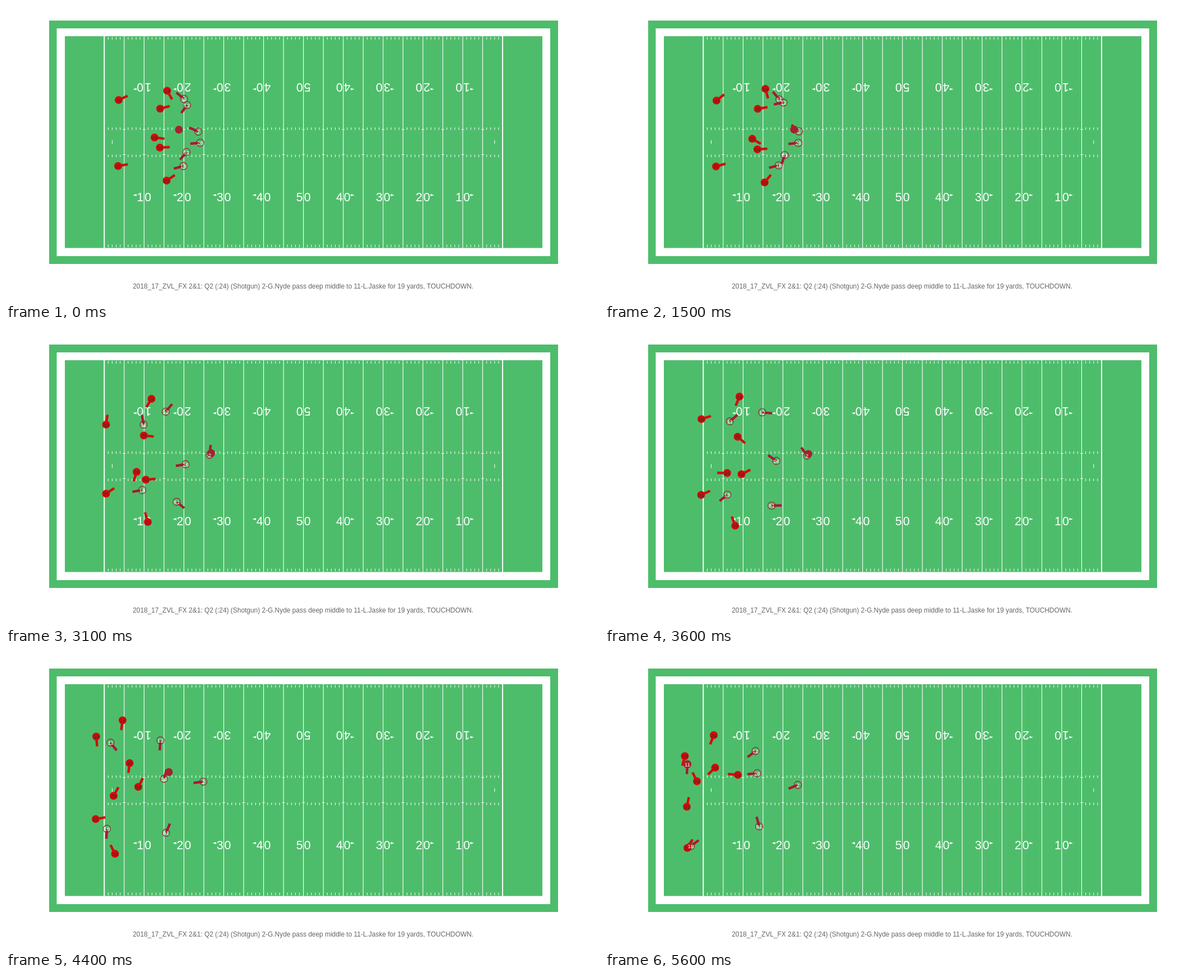
An HTML page with a canvas that plays this animation: 1058 px wide and 529 px high, repeating every 5.7 s.

```html
<!DOCTYPE html>
<html lang="en">
<head>
<meta charset="utf-8">
<title>Football play</title>
<style>
  html, body { margin: 0; width: 100%; height: 100%; overflow: hidden; background: #fff; }
  canvas { display: block; width: 100vw; height: 100vh; }
</style>
</head>
<body>
<canvas id="stage" width="1058" height="529"></canvas>
<script>
const ctx = document.getElementById('stage').getContext('2d');
const FONT = '"Liberation Sans", Arial, sans-serif';
const GREEN = '#4ebd6b';
const CAPTION = '2018_17_ZVL_FX 2&1: Q2 (:24) (Shotgun) 2-G.Nyde pass deep middle to 11-L.Jaske for 19 yards, TOUCHDOWN.';
const LOOP = 5700, STEP = 100;
const SNAP = 1000, SNAP_CAUGHT = 1750, THROW = 3900, PASS_CAUGHT = 5400;
const POSE_TIMES = [SNAP, 3100, 4400, 5600];
const DEFENSE = { color: '#d50a0a', text: '#34302b', filled: true };
const OFFENSE = { color: '#a71930', text: '#fff', filled: false };
const BALL = { color: '#a5222d', spot: { x: 308.5, y: 221 }, carry: { x: 2.5, y: -3 } };

const yardX = yard => 175.3 + 7.107 * yard;
const mix = (a, b, u) => a + (b - a) * u;
const mixPoint = (p, q, u) => ({ x: mix(p.x, q.x, u), y: mix(p.y, q.y, u) });

// ---- motion ----
const players = [];

// A route is the pose [x, y, facing in degrees] at each of POSE_TIMES.
function player(team, number, ...route) {
  const p = { team, number, route };
  players.push(p);
  return p;
}

player(DEFENSE, 39, [201, 168, -25], [178.5, 169, -82], [161, 147.5, 85], [142.5, 182.5, 105]);
player(DEFENSE, 24, [287.5, 151.5, 60], [259.5, 123, 121], [208, 118.5, 98], [194, 145, 111]);
player(DEFENSE, 35, [275, 183.5, -15], [246, 188.5, 6], [220.5, 195, 97], [196.5, 203, 136]);
player(DEFENSE, 26, [265, 235, 7], [233, 253.5, 107], [192, 253.5, 299], [164, 227.5, 244]);
player(DEFENSE, 54, [274.5, 253, -3], [249.5, 267.5, -5], [236, 237.5, -62], [237, 216, -175]);
player(DEFENSE, 31, [200, 286, -10], [178.5, 292.5, -34], [160, 295, -10], [146, 273, -78]);
player(DEFENSE, 33, [286.5, 312, -34], [253, 343, -106], [194.5, 357, -117], [147, 346.5, -59]);

const receiver =
player(OFFENSE, 11, [317.5, 166, -140], [245.5, 169, -99], [186.5, 158.5, 52], [147, 197, 93]);
player(OFFENSE, 12, [323, 177, 126], [285, 146, 310], [275.5, 154.5, 454], [268.5, 173.5, 503]);
const passer =
player(OFFENSE, 2, [343, 224.5, -156], [363.5, 223, -85], [352, 228, -188], [344, 234, -202]);
player(OFFENSE, 26, [346.5, 244.5, 175], [320.5, 240, 171], [282, 223, 286], [271.5, 213, 174]);
player(OFFENSE, 81, [322, 261, 130], [304.5, 307, 40], [285.5, 319.5, -67], [275, 308, -105]);
player(OFFENSE, 18, [316.5, 286, 165], [243, 286, 170], [180, 312.5, 93], [153, 343.5, -37]);

// Cubic through the poses: starts from rest, runs on at the end.
function smooth(values, i, u) {
  const span = k => POSE_TIMES[k + 1] - POSE_TIMES[k];
  const rate = k => (values[k + 1] - values[k]) / span(k);
  const slope = k => {
    if (k === 0) return 0;
    if (k === values.length - 1) return 2 * rate(k - 1) - slope(k - 1);
    return mix(rate(k - 1), rate(k), span(k - 1) / (span(k - 1) + span(k)));
  };
  const v = 1 - u;
  return values[i] * v * v * (1 + 2 * u) + values[i + 1] * u * u * (3 - 2 * u)
    + span(i) * u * v * (v * slope(i) - u * slope(i + 1));
}

function poseAt(p, t) {
  const time = Math.max(t, SNAP);
  let i = 0;
  while (i < POSE_TIMES.length - 2 && time >= POSE_TIMES[i + 1]) i++;
  const u = (time - POSE_TIMES[i]) / (POSE_TIMES[i + 1] - POSE_TIMES[i]);
  const [x, y] = [0, 1].map(axis => smooth(p.route.map(pose => pose[axis]), i, u));
  return { x, y, angle: mix(p.route[i][2], p.route[i + 1][2], u) * Math.PI / 180 };
}

function passerHands(t) {
  const p = poseAt(passer, t);
  return { x: p.x + BALL.carry.x, y: p.y + BALL.carry.y };
}

// Snapped, carried by the passer, thrown, then carried by the receiver.
function ballAt(t) {
  if (t < SNAP) return BALL.spot;
  if (t < SNAP_CAUGHT)
    return mixPoint(BALL.spot, passerHands(SNAP_CAUGHT), (t - SNAP) / (SNAP_CAUGHT - SNAP));
  if (t < THROW) return passerHands(t);
  if (t < PASS_CAUGHT)
    return mixPoint(passerHands(THROW), poseAt(receiver, PASS_CAUGHT), (t - THROW) / (PASS_CAUGHT - THROW));
  return poseAt(receiver, t);
}

// ---- drawing ----
function box(color, left, top, right, bottom) {
  ctx.fillStyle = color;
  ctx.fillRect(left, top, right - left, bottom - top);
}

function line(x1, y1, x2, y2, width, color = '#fff') {
  ctx.strokeStyle = color;
  ctx.lineWidth = width;
  ctx.beginPath();
  ctx.moveTo(x1, y1);
  ctx.lineTo(x2, y2);
  ctx.stroke();
}

function disc(x, y, radius, color, filled) {
  ctx.beginPath();
  ctx.arc(x, y, radius, 0, 2 * Math.PI);
  ctx.fillStyle = ctx.strokeStyle = color;
  ctx.lineWidth = 1.1;
  if (filled) ctx.fill(); else ctx.stroke();
}

function label(text, x, baseline, size, color, spacing = 0) {
  ctx.font = `${size}px ${FONT}`;
  ctx.letterSpacing = `${spacing}px`;
  ctx.textAlign = 'center';
  ctx.fillStyle = color;
  ctx.fillText(text, x + spacing / 2, baseline);
}

function arrow(x, y, side) {
  ctx.fillStyle = '#fff';
  ctx.beginPath();
  ctx.moveTo(x + side * 20, y);
  ctx.lineTo(x + side * 13.5, y - 1.9);
  ctx.lineTo(x + side * 13.5, y + 1.9);
  ctx.fill();
}

function drawField() {
  box('#fff', 0, 0, 1058, 529);
  box(GREEN, 77, 26, 985, 461);
  box('#fff', 90.5, 40, 971, 447);
  box(GREEN, 105, 54, 957, 432.5);

  for (let yard = 0; yard <= 100; yard++) {
    const x = yardX(yard);
    if (yard % 5) {
      for (const top of [55.5, 217, 265.6, 426.5]) line(x, top, x, top + 4.4, 1);
    } else {
      const goal = yard % 100 === 0;
      line(x, 54, x, 432.5, goal ? 1.9 : 1.1);
      if (!goal) for (const y of [220.6, 265.6]) line(x - 2.5, y, x + 2.5, y, 1);
    }
  }
  for (const yard of [2, 98]) line(yardX(yard), 240, yardX(yard), 246.5, 1);

  for (let yard = 10; yard <= 90; yard += 10) {
    const x = yardX(yard), text = Math.min(yard, 100 - yard);
    label(text, x, 349, 21.3, '#fff', 2);
    ctx.save();
    ctx.translate(x, 145.5);
    ctx.rotate(Math.PI);
    label(text, 0, 7.7, 21.3, '#fff', 2);
    ctx.restore();
    if (yard !== 50) for (const y of [338, 148.7]) arrow(x, y, Math.sign(yard - 50));
  }
  label(CAPTION, 530, 505, 11.92, '#666');
}

function drawPlay(t) {
  const poses = players.map(p => ({ ...p.team, number: p.number, ...poseAt(p, t) }));
  for (const p of poses)
    line(p.x, p.y, p.x + 17.7 * Math.cos(p.angle), p.y + 17.7 * Math.sin(p.angle), 4.4, p.color);
  for (const p of poses) disc(p.x, p.y, p.filled ? 7 : 6.6, p.color, p.filled);
  const ball = ballAt(t);
  disc(ball.x, ball.y, 7, BALL.color, true);
  for (const p of poses) label(p.number, p.x, p.y + 3.6, 9.8, p.text);
}

function frame() {
  const t = Math.floor(performance.now() % LOOP / STEP) * STEP;
  drawField();
  drawPlay(t);
  requestAnimationFrame(frame);
}
frame();
</script>
</body>
</html>
```
